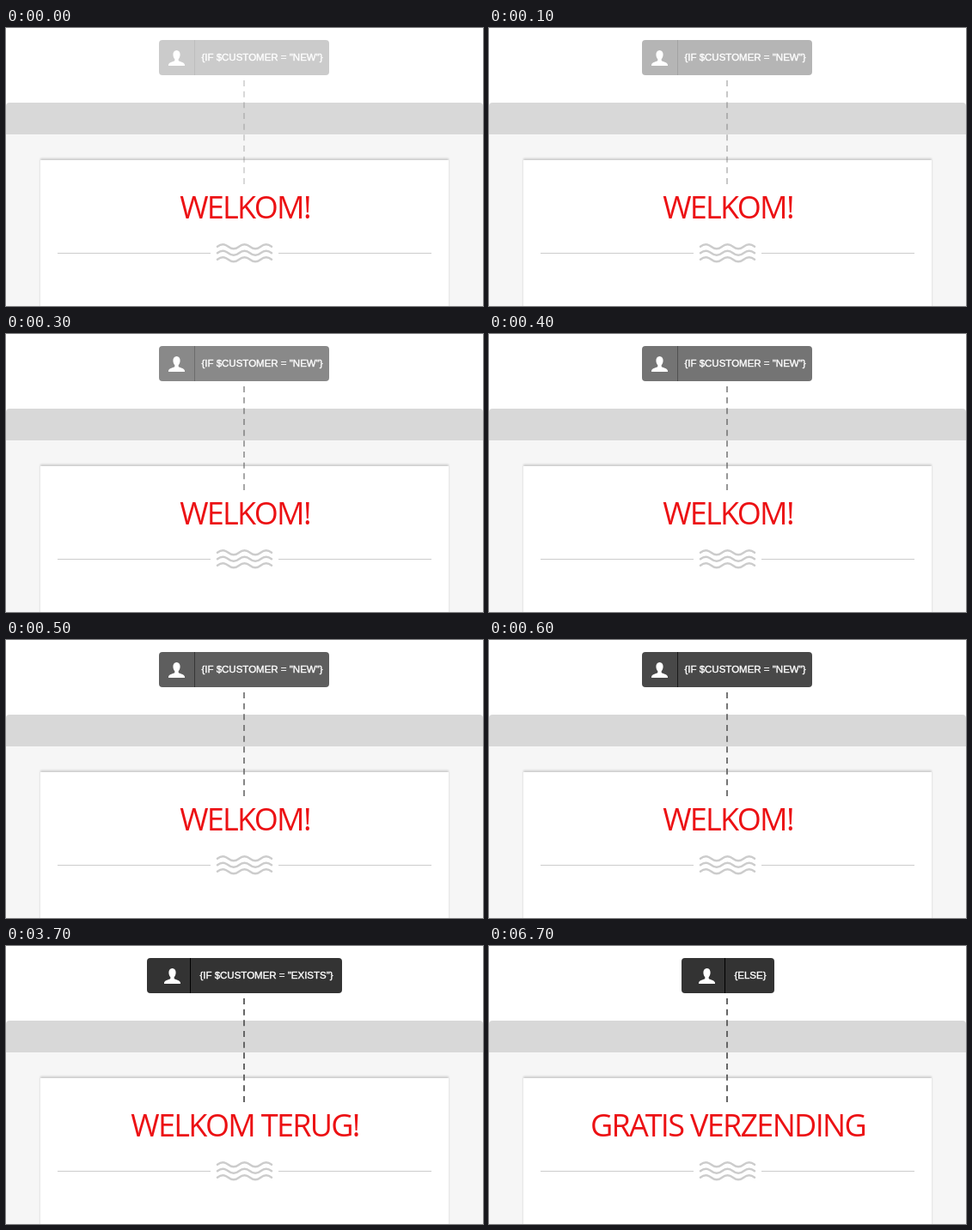
Animation, 555 px wide and 324 px high, one loop 9.7 s. Source, as an HTML page:

```html
<!DOCTYPE html>
<html lang="nl">
<head>
<meta charset="utf-8">
<title>Conditional greeting</title>
<style>
  html, body { margin: 0; width: 100%; height: 100%; overflow: hidden; background: #fff; }
  svg { display: block; width: 555px; height: 324px; }
  .paper { fill: #fff; filter: drop-shadow(0 -1.5px 1.3px rgba(0, 0, 0, .17)); }
  .rule { fill: none; stroke: #ccc; }
  .wave { fill: none; stroke: #ccc; stroke-width: 2.4; stroke-linecap: round; }
  .title { font: 36px "Open Sans", "Noto Sans", sans-serif; letter-spacing: -1.7px; fill: #ec1114; text-anchor: middle; }
  .label { font: 11.5px "Liberation Sans", Arial, sans-serif; fill: #fff; stroke: #fff; stroke-width: .4; }
</style>
</head>
<body>
<svg viewBox="0 0 555 324">
  <rect y="124" width="555" height="200" fill="#f6f6f6"/>
  <path d="M0 124V91q0-4 4-4h547q4 0 4 4v33z" fill="#d8d8d8"/>
  <rect class="paper" x="40" y="154" width="475" height="190"/>
  <path class="rule" d="M60 262.5H238M317 262.5H495"/>
  <g id="waves"></g>
  <text id="title" class="title" x="278" y="222"></text>
  <g id="condition">
    <rect id="box" y="14" height="41" rx="4" fill="#333"/>
    <rect id="divider" y="14" width="1" height="41" fill="#000"/>
    <path id="person" fill="#fff" d="M0 26c2.8 0 4.1 2.2 4.1 5.1 0 2.2-.8 4.2-1.9 5.2v1.6c.7 1.2 7.2 1.8 7.3 5.1v1H-9.5v-1c.1-3.3 6.6-3.9 7.3-5.1v-1.6c-1.1-1-1.9-3-1.9-5.2C-4.1 28.2-2.8 26 0 26z"/>
    <text id="label" class="label" y="38"></text>
    <path d="M277 61V182" stroke="#666" stroke-width="2" stroke-dasharray="7 5.67"/>
  </g>
</svg>
<script>
const LOOP = 9700;
const FADE_STEPS = 7;
const states = [
  { start: 0, title: 'WELKOM!', label: '{IF $CUSTOMER = "NEW"}', left: 178, right: 376, divider: 219, textX: 227.4 },
  { start: 3700, title: 'WELKOM TERUG!', label: '{IF $CUSTOMER = "EXISTS"}', left: 164, right: 391, divider: 214, textX: 225.4 },
  { start: 6700, title: 'GRATIS VERZENDING', label: '{ELSE}', left: 224, right: 332, divider: 274, textX: 285.4 }
];
const el = id => document.getElementById(id);
let shown;

el('waves').innerHTML = [254.7, 262.2, 269.7].map(y =>
  `<path class="wave" d="M246 ${y}q6.3 -5 12.6 0${'t12.6 0'.repeat(4)}"/>`).join('');

function show(state) {
  el('title').textContent = state.title;
  el('label').textContent = state.label;
  el('label').setAttribute('x', state.textX);
  el('box').setAttribute('x', state.left);
  el('box').setAttribute('width', state.right - state.left);
  el('divider').setAttribute('x', state.divider);
  el('person').setAttribute('transform', `translate(${state.divider - 20.5} 0)`);
  shown = state;
}

function render(time) {
  const t = time % LOOP;
  const state = states.findLast(s => t >= s.start);
  if (state !== shown) show(state);
  const step = Math.min(Math.floor(t / 100), FADE_STEPS);
  el('condition').setAttribute('opacity', 0.25 + 0.75 * step / FADE_STEPS);
}

const begin = performance.now();
function tick() {
  render(performance.now() - begin);
  requestAnimationFrame(tick);
}
tick();
</script>
</body>
</html>
```
